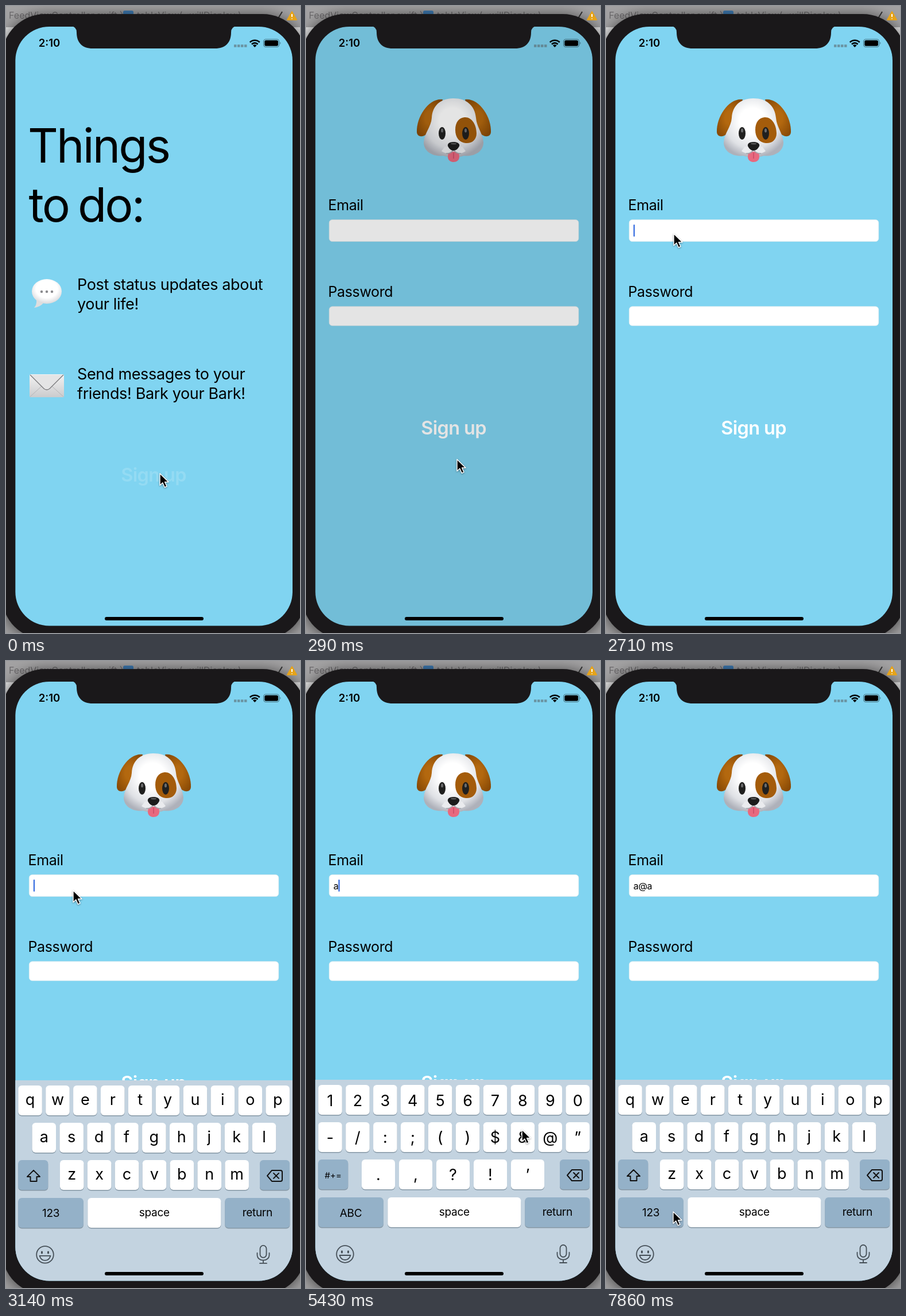
Write an HTML page that moves like this. It is 512 px wide and 1093 px high and loops after 8000 ms.

```html
<!DOCTYPE html>
<html lang="en">
<head>
<meta charset="utf-8">
<title>Sign up</title>
<style>
html, body { margin: 0; width: 100%; height: 100%; overflow: hidden; background: #a3a2a3; }
svg { display: block; width: 100%; height: 100%; }
text { font-family: Inter, Roboto, sans-serif; font-optical-sizing: none; white-space: pre; }
.big { font-size: 82px; letter-spacing: -.035em; }
.item { font-size: 27px; letter-spacing: -.013em; }
.label { font-size: 25px; letter-spacing: -.015em; }
.button { font-size: 32.5px; font-weight: 600; letter-spacing: -.02em; fill: #fff; text-anchor: middle; }
.key { font-size: 27px; text-anchor: middle; }
.word { font-size: 19px; letter-spacing: -.015em; }
.small { font-size: 15px; }
.line { fill: none; stroke: #111; stroke-width: 2; stroke-linecap: round; stroke-linejoin: round; }
.soft { stroke: #454f57; stroke-width: 1.8; }
</style>
</head>
<body>
<svg viewBox="0 0 512 1093">
  <defs>
    <linearGradient id="paper" x2="0" y2="1"><stop stop-color="#f3f3f3"/><stop offset="1" stop-color="#cbcbcd"/></linearGradient>
    <radialGradient id="ear" cx=".5" cy=".5" r=".6"><stop offset=".3" stop-color="#b3680f"/><stop offset="1" stop-color="#8a4b06"/></radialGradient>
    <radialGradient id="fur" cx=".48" cy=".38" r=".62"><stop offset=".35" stop-color="#fff"/><stop offset=".75" stop-color="#dfe1e5"/><stop offset="1" stop-color="#aeb1ba"/></radialGradient>
    <radialGradient id="puff" cx=".5" cy=".4" r=".6"><stop offset=".6" stop-color="#fff"/><stop offset="1" stop-color="#d9d9dc"/></radialGradient>
    <clipPath id="screen"><rect x="16.3" y="36" width="482.7" height="1044.5" rx="59"/></clipPath>
  </defs>

  <!-- desktop behind the phone -->
  <rect width="512" height="1093" fill="#a3a2a3"/>
  <rect y="37" width="512" height="60" fill="#e6e6e6"/>
  <g fill="#6b696b" font-size="16">
    <text x="5" y="22">FeedViewController.swift 〉</text>
    <text x="228" y="22">tableView(_:willDisplay:)</text>
  </g>
  <rect x="204" y="8" width="18" height="18" rx="3" fill="#3f7bb3"/>
  <path d="M473 23L481 10" stroke="#333" stroke-width="2"/>
  <rect x="-7" y="14" width="529" height="1090" rx="75" fill="#1a181a" style="filter:drop-shadow(0 2px 12px #0009)"/>
  <path d="M498 10L506 24H490Z" fill="#e5a31a" stroke="#e5a31a" stroke-width="2" stroke-linejoin="round"/>
  <path d="M498 14V19M498 21.5V22.5" stroke="#fff" stroke-width="2"/>

  <g clip-path="url(#screen)">
    <rect width="512" height="1093"/>
    <g id="todo">
      <rect width="512" height="1093" fill="#80d4f1"/>
      <g class="big">
        <text x="38" y="273">Things</text>
        <text x="39.5" y="376">to</text><text x="125" y="376">do:</text>
      </g>
      <g class="item">
        <text x="124" y="494.5">Post status updates about</text>
        <text x="124" y="529">your life!</text>
        <text x="124" y="650.5">Send messages to your</text>
        <text x="124" y="685">friends! Bark your Bark!</text>
      </g>
      <path d="M53 511Q54 521 49 526Q59 525 66 517Z" fill="#dededf"/>
      <ellipse cx="71" cy="497.5" rx="26" ry="21.5" fill="url(#puff)"/>
      <path d="M62 498H62M71 498H71M80 498H80" stroke="#8b8b8e" stroke-width="4.5" stroke-linecap="round"/>
      <rect x="41" y="642" width="60" height="40" rx="2" fill="url(#paper)"/>
      <path d="M42 681L63 662M100 681L79 662" stroke="#b5b5b7" fill="none"/>
      <path d="M42 643L66 667Q71 671 76 667L100 643" stroke="#77777a" stroke-width="1.3" fill="#e4e4e5"/>
      <text class="button" x="257" y="829" opacity=".16">Sign up</text>
    </g>

    <g id="form">
      <rect width="512" height="1093" fill="#80d4f1"/>
      <path d="M238 163C214 160 192 193 193 220C194 230 207 229 213 220L232 186Z" fill="url(#ear)"/>
      <path d="M277 163C301 160 323 193 322 220C321 230 308 229 302 220L283 186Z" fill="url(#ear)"/>
      <path d="M257 161C234 161 220 174 219 195C218 211 206 221 205 238C205 254 221 263 239 261Q257 268 275 261C293 263 309 254 309 238C308 221 297 211 296 195C294 174 280 161 257 161Z" fill="url(#fur)"/>
      <path d="M276 194C288 193 297 206 297 222C297 234 288 240 278 239C267 238 260 229 260 216C260 203 266 195 276 194Z" fill="#a45c0b"/>
      <path d="M248 254H266L267 263C267 275 247 275 247 263Z" fill="#e8697f"/>
      <path d="M257 256V266" stroke="#c94b64" stroke-width="1.5"/>
      <path d="M236 253Q249 262 257 249Q265 262 278 253L272 245H242Z" fill="#eaebee"/>
      <path d="M257 250Q253 258 244 257M257 250Q261 258 270 257" fill="none" stroke="#a3a6ad" stroke-width="1.5"/>
      <ellipse cx="237" cy="222" rx="6" ry="11" fill="#20201f"/>
      <ellipse cx="278" cy="222" rx="6" ry="11" fill="#20201f"/>
      <ellipse cx="237" cy="217" rx="2" ry="3.5" fill="#6b6c6e"/>
      <ellipse cx="278" cy="217" rx="2" ry="3.5" fill="#6b6c6e"/>
      <path d="M257 237C264 237 268 240 267 244C265 249 261 252 257 252C253 252 249 249 247 244C246 240 250 237 257 237Z" fill="#1c1c1c"/>
      <ellipse cx="257" cy="240" rx="5" ry="1.5" fill="#555"/>

      <text class="label" x="38.5" y="356">Email</text>
      <text class="label" x="38.5" y="507">Password</text>
      <g fill="#fff" stroke="#dfe7ea" stroke-width=".6">
        <rect x="40.3" y="372.5" width="434.5" height="38" rx="5.5"/>
        <rect x="40.3" y="523.8" width="434.5" height="33.5" rx="5.5"/>
      </g>
      <text id="mail" x="47.8" y="398" font-size="16" letter-spacing="-.4"></text>
      <rect id="caret" y="381" width="2.3" height="21" rx="1" fill="#3a6fe0"/>
      <text class="button" x="257" y="747">Sign up</text>
    </g>

    <g id="keyboard">
      <rect y="730" width="512" height="370" fill="#c3d3e0"/>
      <g id="letters"></g>
      <g id="symbols"></g>
      <g id="common"></g>
      <g class="line soft">
        <circle cx="68" cy="1034" r="14.8"/>
        <path d="M62.5 1029V1031M73.500 1029V1031" stroke-width="3"/>
        <path d="M58.5 1036H77.5Q75 1044 68 1044Q61 1044 58.5 1036Z"/>
        <rect x="442.5" y="1018" width="11" height="21" rx="5.5"/>
        <path d="M437.5 1031V1034C437.5 1047 458.5 1047 458.5 1034V1031M448 1044V1049M442 1049H454"/>
      </g>
    </g>

    <rect x="172" y="1065" width="172" height="6" rx="3"/>
    <text x="56.800" y="71" font-size="18.5" font-weight="600">2:10</text>
    <path d="M397 69.500H420" stroke="#555" stroke-opacity=".5" stroke-width="4.500" stroke-dasharray="4.500 1.500"/>
    <g fill="none" stroke="#000" stroke-width="2.7">
      <path d="M424.8 63.3A11.8 11.8 0 0 1 441.7 63.3"/>
      <path d="M428 66.7A7.3 7.3 0 0 1 438.5 66.7"/>
    </g>
    <path d="M433.2 72L430 68.7A4.5 4.5 0 0 1 436.5 68.7Z"/>
    <rect x="448.6" y="58" width="27" height="13.5" rx="4" fill="none" stroke="#000" stroke-opacity=".45" stroke-width="1.2"/>
    <rect x="450.3" y="59.7" width="23.6" height="10.1" rx="2.5"/>
    <path d="M477.3 62.5Q479.5 64.7 477.3 67Z" fill-opacity=".45"/>
  </g>

  <path d="M113 35Q123 36 123 46C123 64 133 74 151 74H364C382 74 392 64 392 46Q392 36 402 35Z" fill="#1a181a"/>
  <path id="pointer" d="M0 0V20.5L4.8 16L8.3 24L12 22.3L8.6 14.7H15Z" stroke="#fff" stroke-width="1.4" stroke-linejoin="round"
    style="filter:drop-shadow(0 1px 1.5px #0006)"/>
</svg>

<script>
const $ = id => document.getElementById(id);
const ROWS = [739, 804, 869, 935];
const GREY = '#94b1c8';

function key(x, y, w, label, { tint = '#fff', cls = '', base = 34.5 } = {}) {
  return `<rect x="${x}" y="${y + 1.5}" width="${w}" height="52" rx="6" fill="#8597a5"/>
    <rect x="${x}" y="${y}" width="${w}" height="52" rx="6" fill="${tint}"/>
    <text class="key ${cls}" x="${x + w / 2}" y="${y + base}">${label}</text>`;
}

function row(labels, x, y, base, pitch = 47.9, w = 41.5) {
  return [...labels].map((c, i) => key(x + i * pitch, y, w, c === '&' ? '&amp;' : c, { base })).join('');
}

const word = (x, y, w, label, tint, base = 32) => key(x, y, w, label, { tint, cls: 'word', base });

$('letters').innerHTML =
  row('qwertyuiop', 21.3, ROWS[0], 34.5) +
  row('asdfghjkl', 45.5, ROWS[1], 34) +
  row('zxcvbnm', 94, ROWS[2], 34) +
  word(21.3, ROWS[2], 52, '', GREY) +
  word(21.3, ROWS[3], 113.5, '123', GREY, 33) +
  '<path class="line" d="M48 887L59 898H53.5V906H42.5V898H37Z"/>';

$('symbols').innerHTML =
  row('1234567890', 21.3, ROWS[0], 36.5) +
  row('-/:;()$&@”', 21.3, ROWS[1], 35.5) +
  row('.,?!’', 97, ROWS[2], 36, 65, 58) +
  key(21.3, ROWS[2], 52, '#+=', { tint: GREY, cls: 'small', base: 33 }) +
  word(21.3, ROWS[3], 113.5, 'ABC', GREY, 34);

$('common').innerHTML =
  word(442, ROWS[2], 52, '', GREY) +
  word(142.3, ROWS[3], 232, 'space') +
  word(381.3, ROWS[3], 113, 'return', GREY) +
  '<path class="line" d="M463 887H478Q481 887 481 890V903Q481 906 478 906H463L455 896.5ZM466 892L475 901M475 892L466 901"/>';

// pointer stops: time, x, y
const PATH = [
  [140, 268, 815], [1140, 181, 385], [1430, 181, 385], [1570, 176, 388], [1860, 176, 388],
  [2570, 118, 397], [2720, 118, 397], [3140, 117, 400], [3300, 117, 400],
  [4000, 66, 828], [4290, 66, 828], [4860, 100, 960], [5000, 100, 960],
  [5430, 376, 817], [5720, 425, 826], [6000, 425, 826], [6570, 90, 960], [6860, 90, 960],
  [7290, 68, 830], [7430, 68, 830], [7857, 117, 960]
];
const TYPED = [[2700, ''], [4130, 'a'], [5850, 'a@'], [7280, 'a@a']];
const LOOP = 8000, STEP = 1000 / 7;

function pointerAt(t) {
  const i = PATH.findIndex(p => p[0] > t);
  if (i === 0) return PATH[0].slice(1);
  if (i < 0) return PATH[PATH.length - 1].slice(1);
  const [t0, x0, y0] = PATH[i - 1], [t1, x1, y1] = PATH[i];
  const u = (t - t0) / (t1 - t0), e = u * u * (3 - 2 * u);
  return [x0 + (x1 - x0) * e, y0 + (y1 - y0) * e];
}

const show = (id, on) => $(id).setAttribute('visibility', on ? 'inherit' : 'hidden');

function draw(t) {
  const fade = t < 140 ? 0 : Math.min(1, .41 + (t - 140) / 300);
  $('todo').setAttribute('opacity', Math.max(0, 1 - 1.15 * fade));
  $('form').setAttribute('opacity', fade);

  const last = TYPED.filter(e => e[0] <= t).pop();
  $('mail').textContent = last ? last[1] : '';
  $('caret').setAttribute('x', 47.8 + $('mail').getComputedTextLength());
  show('caret', last && (t - last[0]) % 1000 < 500);

  const rise = Math.max(0, t - 2800) / 42;
  $('keyboard').setAttribute('transform', `translate(0 ${351 * (1 + rise) * Math.exp(-rise)})`);
  const symbols = t > 4800 && t < 6700;
  show('symbols', symbols);
  show('letters', !symbols);

  $('pointer').setAttribute('transform', `translate(${pointerAt(t)})`);
}

function tick() {
  const t = performance.now() % LOOP;
  draw(Math.floor((t + 4.5) / STEP) % 56 * STEP);
  requestAnimationFrame(tick);
}
tick();
</script>
</body>
</html>
```
